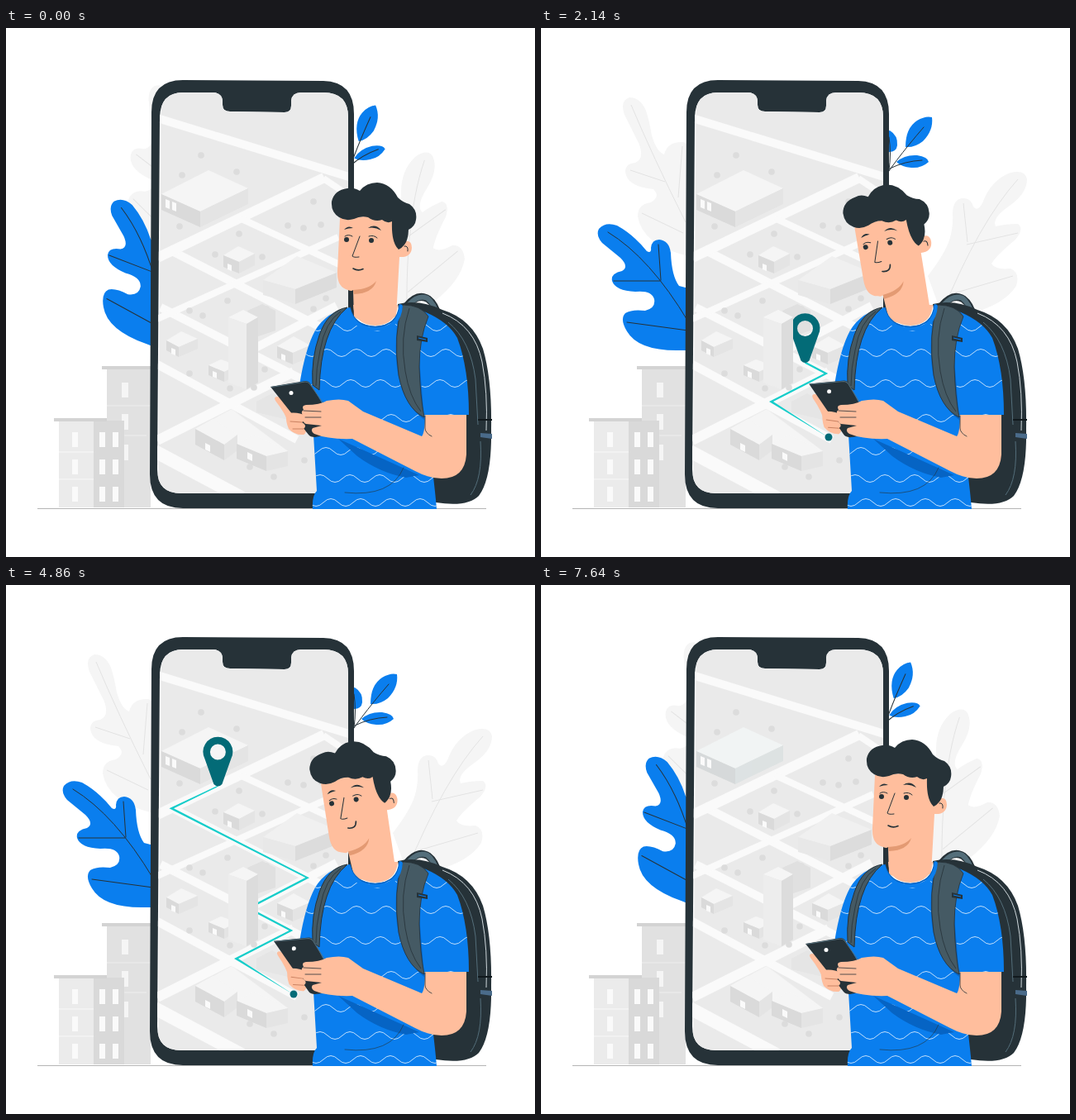
These frames come from a looping animation (640x640 px, 7.78 s). An HTML page:

```html
<!DOCTYPE html>
<html lang="en">
<head>
<meta charset="utf-8">
<title>Map navigation</title>
<style>
html, body { margin: 0; width: 100%; height: 100%; overflow: hidden; background: #fff }
svg { display: block; width: 100vw; height: 100vh }
.ink { fill: #263238 }
.blue { fill: #0a7eee }
.skin { fill: #ffbe9d }
.pale { fill: #f5f5f5 }
.line { fill: none; stroke: #263238; stroke-width: 1; stroke-linecap: round; stroke-linejoin: round }
.vein { fill: none; stroke: #e3e3e3; stroke-width: 1 }
.road { fill: none; stroke: #fafafa }
</style>
</head>
<body>
<svg viewBox="0 0 640 640">
  <defs>
    <clipPath id="screen"><path d="M214 78H250Q261 78 262 88V93Q262 101 271 101L337 102Q345 102 345 94V88Q346 78 357 78H384Q414 78 414 108V563H212Q183 563 183 534L186 108Q187 78 214 78Z"/></clipPath>
    <clipPath id="ribbon"><path d="M348 495.4L276 452 342.5 418 291 391 362.3 354 197.5 270.3 313 216 203 270.3 367 354.3 296 391 347.3 418 281 452Z"/></clipPath>
    <path id="shirtShape" d="M416 338Q388 343 374 366Q362 388 355 432L372 492L376 560Q370 566 371 582H521Q518 545 507 468H560Q560 412 546 375Q530 346 476 334Q474 360 447 361Q421 360 416 338Z"/>
    <clipPath id="shirt"><use href="#shirtShape"/></clipPath>
  </defs>

  <g id="leafBack">
    <path class="pale" d="M190 310L175 275Q123 262 117 228Q117 213 133 211Q145 204 136 195Q104 192 102 174Q102 164 114 163Q126 158 118 139L101 105Q95 88 107 84Q120 84 127 100Q131 112 134 130Q140 150 149 153Q153 137 172 138Q190 145 190 170Z"/>
    <path class="vein" d="M109 93Q135 155 175 235M108 172L150 186M122 224L172 248M171 143L166 205"/>
  </g>
  <g id="leafRight">
    <path class="pale" d="M485 347L468 300Q485 278 492 262Q499 245 498 225Q498 207 510 206Q520 205 523 216Q528 223 534 212Q544 184 568 175Q586 171 588 183Q588 200 567 215Q545 230 550 240Q562 237 577 237Q585 243 574 256Q552 274 545 285Q550 293 568 291Q580 296 575 312Q560 335 520 345Z"/>
    <path class="vein" d="M577 183Q530 235 485 345M511 212L516 259M577 248L515 262M571 300L496 322"/>
  </g>
  <g id="leafBlue">
    <path class="blue" d="M190 390H168Q118 391 104 367Q95 352 102 345Q110 340 126 342Q139 339 137 328Q134 317 114 319Q90 318 86 306Q84 297 98 294Q107 289 96 278L74 260Q66 251 70 243Q78 234 92 239Q112 250 128 270Q134 273 133 266Q134 256 143 256Q155 257 157 272Q158 300 167 312L190 318Z"/>
    <path class="line" d="M81 247Q132 278 178 355M142 262L145 305M88 306L144 306M104 356L178 366"/>
  </g>
  <g id="sprig">
    <path class="blue" d="M441 144Q441 121 455 112Q465 106 473 108Q475 124 462 137Q452 145 441 144ZM430 162Q440 153 455 154Q468 156 469 162Q460 170 448 169Q436 168 430 162ZM421 150Q409 126 422 124Q432 130 431 142Q430 150 421 150Z"/>
    <path class="line" d="M410 190Q425 164 463 120M422 170Q440 161 461 160M421 172Q424 152 421 132"/>
  </g>

  <path fill="#e1e1e1" d="M122 413H175V580H122Z"/>
  <path fill="#d3d3d3" d="M116 409H175V413H116Z"/>
  <path class="pale" d="M140 429H148V447H140ZM140 467H148V486H140ZM142 504H148V523H142Z"/>
  <path class="vein" style="stroke:#eee" d="M122 457H175M143 493H170"/>
  <path fill="#ebebeb" d="M64 475H106V580H64Z"/>
  <path fill="#d9d9d9" d="M106 475H143V580H106Z"/>
  <path fill="#d3d3d3" d="M58 472H122V476H58Z"/>
  <path id="windows" fill="#fafafa"/>
  <path class="vein" style="stroke:#f8f8f8" d="M64 513H106M64 546H106"/>
  <path class="vein" style="stroke:#b5b5b5" d="M38 581.5H581"/>

  <path class="ink" d="M214 63L384 64Q421 65 421 104V581H214Q174 581 174 540L176 102Q176 63 214 63Z"/>
  <g clip-path="url(#screen)">
    <path fill="#fafafa" d="M180 70H420V570H180Z"/>
    <path fill="#eaeaea" d="M188 70H414V563H184Z"/>
    <g class="road">
      <path stroke-width="10" d="M183 109L418 181M187 338L360 426M197 268L400 372M294 391L400 336M183 407L352 498"/>
      <path stroke-width="12" d="M385 181L183 278M348 416L183 499"/>
      <path stroke-width="8" d="M283 230L414 291M402 253L183 352M384 182L418 205"/>
      <path stroke-width="16" d="M180 512L285 568"/>
    </g>
    <g id="trees" fill="#dcdcdc"></g>
    <path fill="#e0e0e0" d="M292 342L310 334L326 342V366L305 373Z"/>
    <path fill="#e5e5e5" d="M303 452L322 442L345 455V475L303 465Z"/>
    <path class="pale" d="M229 485L273 461L341 512L315 518L264 504Z"/>
    <g id="houses"></g>
    <path fill="#fafafa" d="M193 207L198 209V219L193 217ZM201 210L206 212V222L201 220ZM268 285L273 287V294L268 292ZM200 387L205 389V396L200 394ZM250 415L255 417V424L250 422ZM333 394L338 396V403L333 401ZM241 502L247 505V513L241 510ZM292 513L298 516V524L292 521Z"/>
    <g clip-path="url(#ribbon)"><path id="route" fill="none" stroke="#16cdca" stroke-width="6" d="M348 495L278 452L345 418L294 391L365 354L200 270L313 216"/></g>
    <g id="tower"></g>
    <circle id="dot" cx="348" cy="495" r="4.5" fill="#036b77"/>
    <path id="pin" fill="#036b77" fill-rule="evenodd" d="M-5 -2L-16 -33A18 18 0 1 1 16 -33L5 -2Q0 3 -5 -2ZM-9.5 -41a9.5 9.5 0 1 0 19 0a9.5 9.5 0 1 0 -19 0Z"/>
    <use id="towerFront" href="#tower"/>
  </g>

  <path fill="none" stroke="#263238" stroke-width="9" d="M484 337Q498 320 511 328Q519 334 523 349"/>
  <path fill="none" stroke="#546e7a" stroke-width="6" d="M487 335Q499 322 510 327Q518 333 522 349"/>
  <path class="ink" d="M474 334Q500 328 528 341Q564 352 577 388Q588 425 587 485Q588 545 572 566Q558 580 520 574L500 480Z"/>
  <path fill="none" stroke="#cfd8dc" d="M528 345Q567 360 576 404Q583 440 581 487"/>
  <path fill="none" stroke="#546e7a" d="M535 356Q562 378 568 425L571 480M574 500Q577 545 562 565"/>
  <path fill="none" stroke="#11191d" stroke-width="2" d="M571 474H588"/>
  <path fill="#4a6b8a" d="M574 490L588 491V497L574 495Z"/>

  <use class="blue" href="#shirtShape"/>
  <g clip-path="url(#shirt)">
    <path id="waves" fill="none" stroke="#fff" stroke-opacity=".75"/>
    <path fill="#0664c4" d="M402 497L500 541L484 544Q452 538 425 518Z"/>
    <path fill="#0664c4" d="M474 352Q468 400 477 430Q484 458 506 474L500 400Z"/>
    <path class="line" stroke-opacity=".6" d="M410 562Q466 568 481 532M507 468L513 488"/>
  </g>
  <path fill="#455a64" stroke="#263238" d="M413 338Q389 342 379 372Q369 400 371 432L379 438Q380 400 388 377Q396 352 413 338Z"/>
  <path fill="none" stroke="#263238" stroke-width=".8" d="M405 343Q386 355 380 390Q375 412 375 433"/>
  <path fill="#455a64" stroke="#263238" stroke-width=".8" d="M480 335Q502 335 511 349Q500 375 500 410Q501 445 506 471Q483 460 475 420Q468 370 480 335Z"/>
  <path fill="none" stroke="#263238" stroke-width=".8" d="M488 339Q476 375 483 415Q488 446 502 464"/>
  <path class="ink" d="M497 372L510 375V380L497 378Z"/>
  <path fill="none" stroke="#0a7eee" d="M499 375L508 377"/>

  <path class="skin" d="M420 335Q421 359 447 360Q472 359 474 335Z"/>
  <g id="head">
    <path class="skin" d="M404 230L401 294Q400 314 414 317Q418 319 420 317L421 350Q446 362 472 349L476 277Q490 278 491 266Q491 256 482 258L484 225Z"/>
    <path fill="#e39a73" d="M420 317Q440 316 448 306Q444 321 421 322Z"/>
    <path class="ink" d="M403 229Q393 223 394 210Q397 196 413 194Q420 192 428 197Q436 187 449 187Q465 188 474 205Q480 211 488 213Q498 220 496 232Q495 240 487 244Q487 262 475 268Q466 260 467 234Q461 237 455 232Q446 235 438 229Q429 227 421 231Q411 234 403 229Z"/>
    <circle class="ink" cx="412" cy="256" r="3"/>
    <circle class="ink" cx="442" cy="257" r="3"/>
    <path class="line" d="M428 252L419 276Q421 278 427 277M410 252Q414 249 419 252M439 252Q445 250 449 254M482 264Q487 263 486 270"/>
    <path class="ink" d="M409 244Q414 238 420 242Q414 242 409 244ZM438 242Q447 236 454 245Q446 240 438 242Z"/>
    <path id="mouth" class="line" style="stroke-width:1.6"/>
  </g>
  <path fill="none" stroke="#0664c4" stroke-width="1.5" d="M416 338Q421 361 447 361.500Q474 360 476 335"/>
  <path fill="none" stroke="#0a7eee" stroke-width="4" d="M414.500 340Q420 364 447 364.500Q476 364 478 336"/>

  <g id="phoneHand">
    <path class="skin" d="M326 451Q323 446 329 446L342 455L366 484L360 492Q347 489 342 479Q338 466 326 451Z"/>
    <path class="ink" d="M320 434L362 427Q366 427 368 430L398 480L390 492L374 495Q368 495 366 492Z"/>
    <path fill="none" stroke="#546e7a" d="M321 434.500L362 428Q365 428 367 430L388 460"/>
    <circle cx="345" cy="441.500" r="2.500" fill="#fff"/>
    <path class="skin" d="M339 466Q355 464 362 469Q365 474 358 477Q365 481 360 485Q365 489 360 492Q350 493 342 485Q338 476 339 466Z"/>
    <path class="line" stroke-width=".7" style="stroke:#c98262" d="M344 476L358 477M347 485L360 485"/>
  </g>
  <path class="skin" d="M360 462Q357 457 363 456Q380 456 388 451Q404 448 414 451L432 464L503 494Q507 489 507 468H557V516Q555 545 527 545Q512 545 495 536L419 497Q390 498 373 491Q368 488 371 484L382 481L363 479Q357 476 361 471Q355 465 360 462Z"/>
  <path class="line" style="stroke-width:.8" d="M360 463L381 464M362 471L381 471M507 469V484Q507 490 515 494"/>
</svg>
<script>
const LOOP = 7780;
const $ = id => document.getElementById(id);
const set = (id, name, value) => $(id).setAttribute(name, value);

// Four roof corners (left, back, right, front), then wall height
function block(id, [lx, ly, tx, ty, rx, ry, fx, fy, h], shades = ['#f5f5f5', '#dadada', '#e4e4e4']) {
  const faces = [
    [lx, ly, tx, ty, rx, ry, fx, fy],
    [lx, ly, fx, fy, fx, fy + h, lx, ly + h],
    [fx, fy, rx, ry, rx, ry + h, fx, fy + h]
  ];
  $(id).innerHTML += faces.map((f, i) => `<polygon points="${f}" fill="${shades[i]}"/>`).join('');
}

const hall = [188, 201, 245, 172, 293, 194, 235, 222, 19];
[
  hall,
  [263, 275, 281, 264, 301, 273, 282, 283, 14],
  [194, 378, 212, 367, 232, 376, 209, 386, 12],
  [245, 408, 260, 401, 280, 408, 264, 416, 12],
  [328, 385, 348, 373, 368, 384, 347, 393, 14],
  [229, 485, 250, 473, 280, 492, 264, 504, 19],
  [279, 503, 300, 492, 341, 512, 315, 518, 18]
].forEach(b => block('houses', b));
block('houses', [311, 305, 352, 276, 400, 296, 350, 316, 18], ['#f0f0f0', '#e8e8e8', '#dcdcdc']);
$('houses').innerHTML += '<g id="glow"></g>';
block('glow', hall, ['#b6efef', '#98cfd0', '#7fcfd2']);
block('tower', [269, 350, 287, 341, 305, 350, 291, 358, 79], ['#f5f5f5', '#ededed', '#dcdcdc']);

const trees = [236,154, 213,178, 279,174, 210,240, 372,210, 341,239, 360,242, 381,238, 282,249, 253,274, 310,277, 387,327,
  372,340, 222,342, 238,348, 268,330, 315,340, 222,418, 313,413, 271,436, 300,435, 295,531, 324,543, 361,523];
for (let i = 0; i < trees.length; i += 2)
  $('trees').innerHTML += `<circle cx="${trees[i]}" cy="${trees[i + 1]}" r="3.8"/>`;

set('windows', 'd', [489, 522, 555].map(y => [80, 113, 129].map(x => `M${x} ${y}h7v18h-7Z`).join('')).join(''));
set('waves', 'd', [362, 393, 430, 472, 512, 545, 574].map((y, i) =>
  `M${350 - i * 7 % 20} ${y}q9 -9 18 0` + 't18 0'.repeat(12)).join(''));

const clamp = x => Math.max(0, Math.min(1, x));
const ease = (t, a, b) => (1 - Math.cos(Math.PI * clamp((t - a) / (b - a)))) / 2;
const pulse = (t, a, b, c, d) => ease(t, a, b) - ease(t, c, d);
const mix = (a, b, p) => a + (b - a) * p;

const travel = [[570, 0], [930, 44], [2140, 186], [4210, 458], [5340, 605]];
function distance(t) {
  for (let i = 1; i < travel.length; i++) {
    const [t0, d0] = travel[i - 1], [t1, d1] = travel[i];
    if (t < t1) return mix(d0, d1, clamp((t - t0) / (t1 - t0)));
  }
  return 605;
}

// id, folded angle, pivot, start of unfolding, start of folding
const leaves = [
  ['leafBack', 19, '190 310', 180, 6070],
  ['leafRight', -23, '485 345', 280, 6070],
  ['leafBlue', 21, '190 390', 370, 6150],
  ['sprig', -16.5, '410 190', 230, 6270]
];
const route = $('route'), total = route.getTotalLength();

function draw(t) {
  for (const [id, angle, pivot, open, close] of leaves)
    set(id, 'transform', `rotate(${angle * (1 - pulse(t, open, open + 1000, close, close + 1000))} ${pivot})`);

  const look = pulse(t, 370, 1370, 4750, 5400);
  set('head', 'transform', `rotate(${-12.3 * look} 445 350)`);
  set('phoneHand', 'transform', `rotate(${4 * look} 372 492)`);
  const smile = clamp(look * 1.6);
  set('mouth', 'd', `M${mix(420, 425.5, smile)} ${mix(291, 289, smile)}Q${mix(426, 435, smile)} ${mix(294.5, 292, smile)} ${mix(432, 436.5, smile)} ${mix(291.5, 283, smile)}`);

  const d = Math.min(distance(t), total);
  const from = total * clamp((t - 5690) / 1500);
  route.style.display = d > from ? '' : 'none';
  set('route', 'stroke-dasharray', `0 ${from} ${Math.max(0, d - from)} 2000`);
  const p = route.getPointAtLength(d);
  set('pin', 'transform', `translate(${p.x} ${p.y})`);
  set('pin', 'opacity', pulse(t, 380, 600, 5370, 5690));
  set('dot', 'opacity', pulse(t, 300, 500, 7150, 7500));
  $('towerFront').style.display = d > 157 && d < 295 ? '' : 'none';
  set('glow', 'opacity', pulse(t, 300, 700, 1000, 1500) + pulse(t, 4900, 5400, 7100, 7740));
}

const begin = performance.now();
function tick() {
  draw((performance.now() - begin) % LOOP);
  requestAnimationFrame(tick);
}
tick();
</script>
</body>
</html>
```
